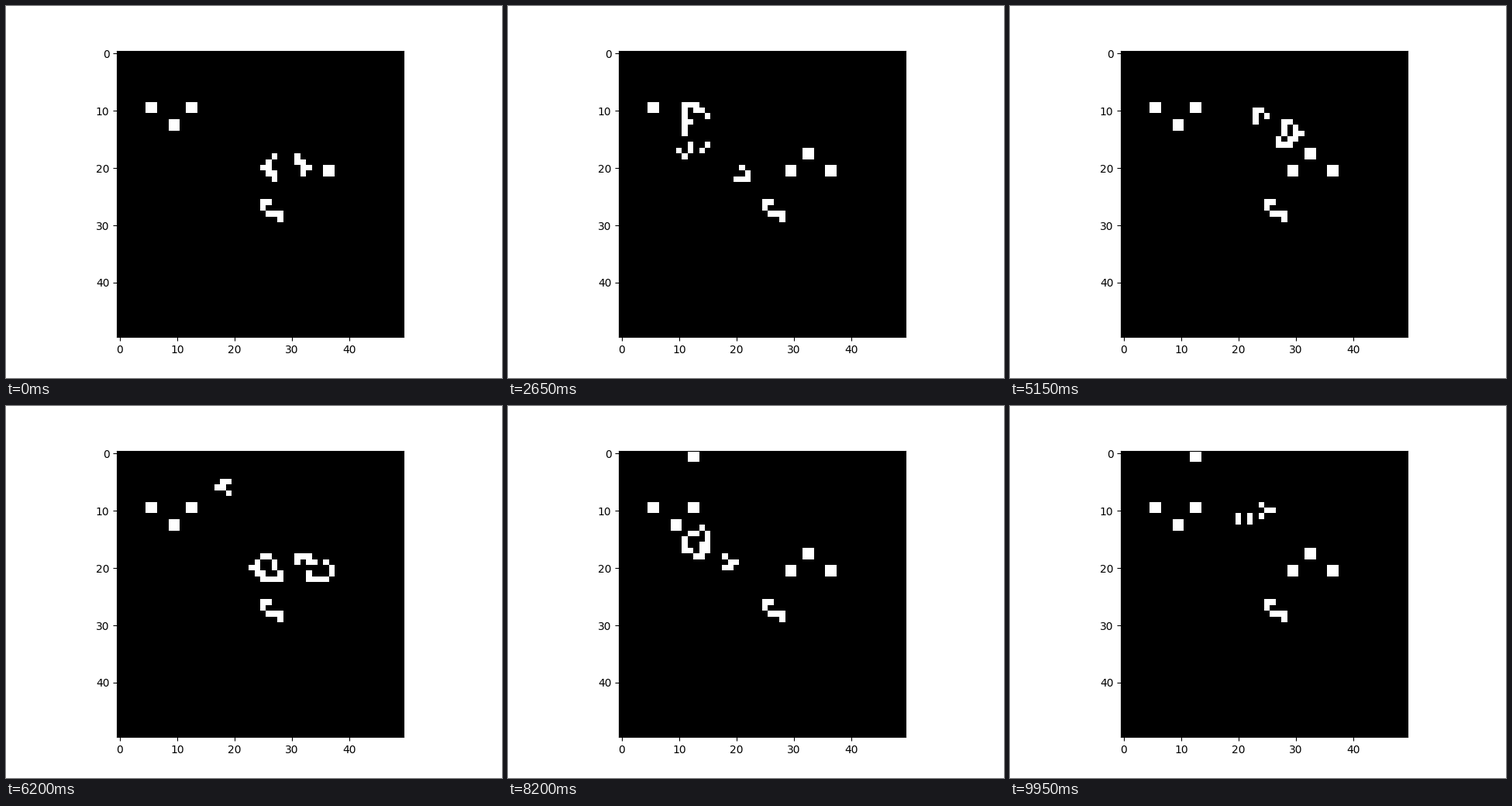
These frames come from a looping animation (640x480 px, 10000 ms). A matplotlib script:

```python
import matplotlib.pyplot as plt
import numpy as np
from matplotlib.animation import FuncAnimation

SIZE = 50
FRAMES = 200
INTERVAL = 50

# Glider gun with an eater, placed with its top left corner at (ROW, COL).
ROW, COL = 9, 5
GUN = {
    0: "OO.....OO",
    1: "OO.....OO",
    3: "....OO",
    4: "....OO",
    9: "......................OO.OO",
    10: ".....................O.....O",
    11: ".....................O......O..OO",
    12: ".....................OOO...O...OO",
    13: "..........................O",
    17: "....................OO",
    18: "....................O",
    19: ".....................OOO",
    20: ".......................O",
}


def seed():
    grid = np.zeros((SIZE, SIZE), dtype=int)
    for r, line in GUN.items():
        for c, char in enumerate(line):
            grid[ROW + r, COL + c] = char == "O"
    return grid


def step(grid):
    """One generation of Life; everything beyond the edge is dead."""
    padded = np.pad(grid, 1)
    around = sum(
        padded[r:r + SIZE, c:c + SIZE]
        for r in range(3) for c in range(3) if (r, c) != (1, 1)
    )
    return ((around == 3) | ((grid == 1) & (around == 2))).astype(int)


generations = [step(seed())]
while len(generations) < FRAMES:
    generations.append(step(generations[-1]))

fig, ax = plt.subplots(figsize=(6.4, 4.8), dpi=100)
image = ax.imshow(generations[0], cmap="gray", vmin=0, vmax=1,
                  interpolation="nearest")


def update(i):
    image.set_data(generations[i])
    return [image]


anim = FuncAnimation(fig, update, frames=FRAMES, interval=INTERVAL,
                     repeat=True, repeat_delay=0)
plt.show()
```
